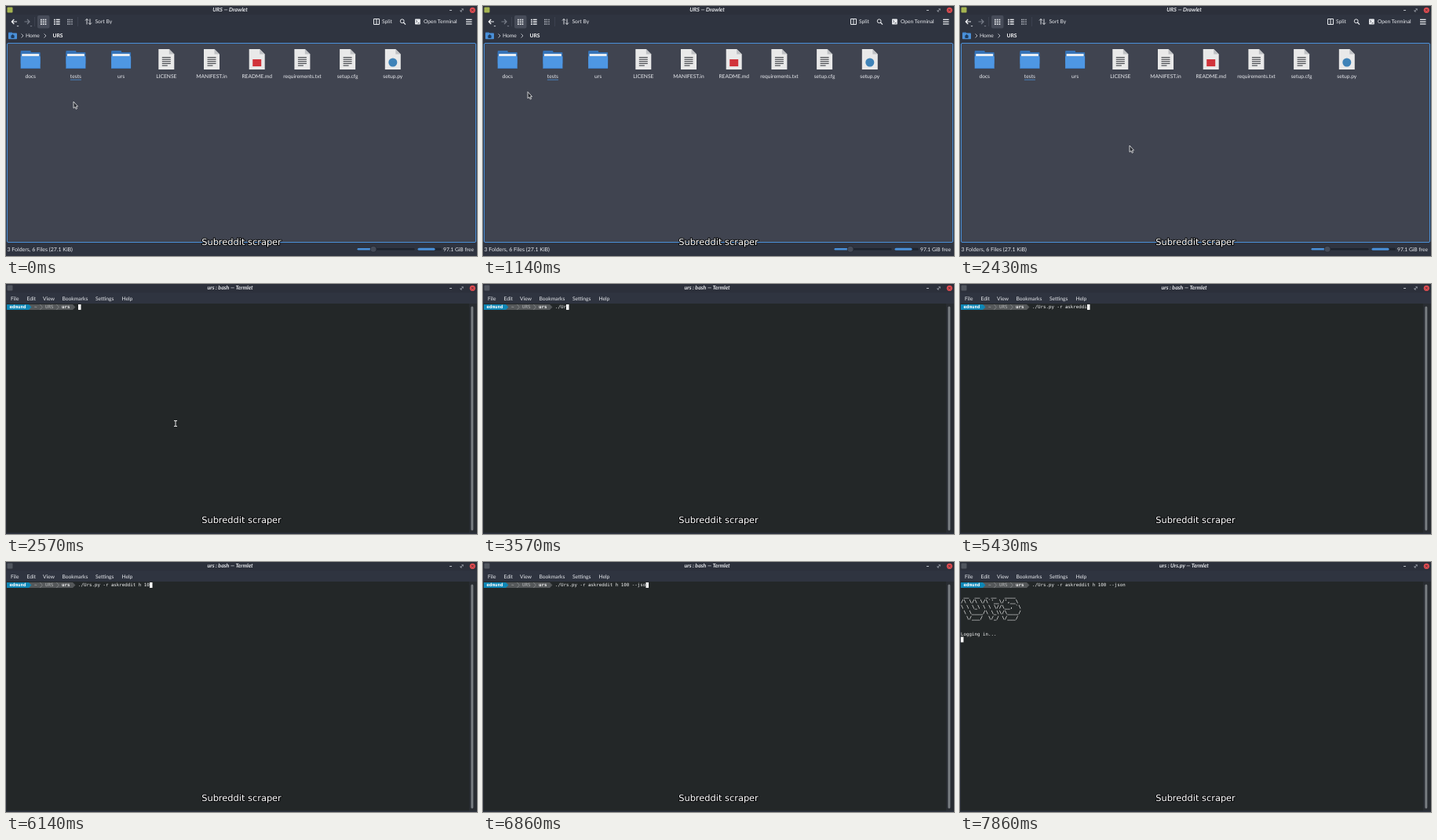
Animation of 600x319 px, one loop 8000 ms. Source, as an HTML page with a canvas:

```html
<!DOCTYPE html>
<html lang="en">
<head>
<meta charset="utf-8">
<title>Subreddit scraper</title>
<style>
html, body { margin: 0; width: 100%; height: 100%; overflow: hidden; background: #2c303b; }
canvas { display: block; }
</style>
</head>
<body>
<canvas id="stage" width="600" height="319"></canvas>
<script>
const ctx = document.getElementById("stage").getContext("2d");
ctx.textRendering = "geometricPrecision";

const LOOP = 8000, STEP = 1000 / 7;
const UI = "Lato, 'Open Sans', sans-serif";
const MONO = "'DejaVu Sans Mono', monospace";
const CELL = 3.5, ROW = 6.95;
const BLUE = "#4a90d9", PALE = "#e9ebef";

const COMMAND = "./Urs.py -r askreddit h 100 --json";
const BANNER = [
  " __  __  _ __   ____",
  "/\\ \\/\\ \\/\\`'__\\/',__\\",
  "\\ \\ \\_\\ \\ \\ \\//\\__, `\\",
  " \\ \\____/\\ \\_\\\\/\\____/",
  "  \\/___/  \\/_/ \\/___/"
];
const ITEMS = ["docs", "tests", "urs", "LICENSE", "MANIFEST.in", "README.md",
  "requirements.txt", "setup.cfg", "setup.py"];

// Keys are [step, value, ...].
const POINTER = [[0, 86, 122], [6, 29, 115], [7, 29, 115], [9, 85, 104], [11, 85, 104], [14, 216, 178]];
const TYPING = [[22, 0], [30, 11], [31, 12], [38, 20], [46, 30], [48, 33], [49, 34]];

function at(keys, s) {
  const i = keys.findIndex(k => k[0] > s);
  if (i < 0) return keys[keys.length - 1].slice(1);
  if (i === 0) return keys[0].slice(1);
  const a = keys[i - 1], b = keys[i], f = (s - a[0]) / (b[0] - a[0]);
  return a.slice(1).map((v, j) => v + (b[j + 1] - v) * f);
}

function rect(x, y, w, h, color, r = 0) {
  ctx.fillStyle = color;
  ctx.beginPath();
  ctx.roundRect(x, y, w, h, r);
  ctx.fill();
}

function disc(x, y, r, color) {
  ctx.fillStyle = color;
  ctx.beginPath();
  ctx.arc(x, y, r, 0, 7);
  ctx.fill();
}

function poly(points, color) {
  ctx.fillStyle = color;
  ctx.beginPath();
  points.forEach(p => ctx.lineTo(...p));
  ctx.closePath();
  ctx.fill();
}

function stroke(path, color, width = 1) {
  ctx.strokeStyle = color;
  ctx.lineWidth = width;
  ctx.stroke(new Path2D(path));
}

function text(str, x, y, { size = 6.7, weight = "", font = UI, color = PALE, align = "left" } = {}) {
  ctx.font = `${weight} ${size}px ${font}`;
  ctx.fillStyle = color;
  ctx.textAlign = align;
  ctx.fillText(str, x, y);
}

function mono(str, col, row, color = "#f4f5f5", weight = "") {
  text(str, 1 + col * CELL, 31.4 + row * ROW, { size: 5.81, font: MONO, color, weight });
}

function block(col, row) {
  rect(1 + col * CELL, 26 + row * ROW, CELL, ROW, "#fff");
}

function titleBar(title, icon) {
  rect(0, 0, 600, 11, "#2c303b");
  rect(1.5, 1.5, 7, 7, icon, 1);
  text(title, 285.5, 7.2, { size: 7, weight: "italic bold", align: "center" });
  stroke("M565 5.5h3", "#c5c8ce", 0.9);
  stroke("M579.2 6.8l3-3M580.3 3.7h2v2M579 5v2h2", "#aeb2ba", 0.7);
  disc(594.3, 5.3, 3.6, "#dc4b50");
  stroke("M593 4l2.6 2.6M595.6 4L593 6.6", "#4a2830", 0.8);
}

function toolbar() {
  stroke("M14 20H7.5M10.3 17L7.3 20l3 3", "#f4f5f7", 1.2);
  stroke("M23.500 20h6M27 17l3 3-3 3", "#777c88", 1.2);
  poly([[13.500, 25], [16.500, 25], [15, 26.600]], "#c8cbd1");
  poly([[30.500, 25], [33.500, 25], [32, 26.600]], "#777c88");
  rect(40, 12, 15.5, 16.500, "#474c59", 2);
  for (let i = 0; i < 3; i++) {
    const y = 16.7 + i * 2.8;
    for (let j = 0; j < 3; j++) {
      rect(44 + j * 2.8, y, 1.7, 1.7, "#eceef1");
      rect(78 + j * 2.6, y, j ? 1.5 : 1.8, 1.5, "#aeb2bb");
    }
    rect(61, y, 1.7, 1.7, PALE);
    rect(63.7, y, 5, 1.5, PALE);
    rect(586, y, 7.5, 1.3, PALE);
  }
  stroke("M36.5 14v12M91.5 14v12", "#414653", 0.8);
  stroke("M103 23.500v-7M101 18.500l2-2 2 2M107 16.500v7M105 21.500l2 2 2-2", PALE, 0.9);
  text("Sort By", 113.5, 22.4);
  stroke("M468.500 16.500h7v7h-7zM472 16.500v7", PALE, 1);
  text("Split", 479, 22.4);
  ctx.beginPath();
  ctx.arc(504.7, 19.3, 2.4, 0, 7);
  ctx.strokeStyle = PALE;
  ctx.stroke();
  stroke("M506.400 21l2.600 2.600", PALE, 1.3);
  rect(521, 16.5, 6.8, 7, PALE, 0.7);
  stroke("M522.300 18.300l1.500 1.300-1.500 1.300M524.500 21.800h2", "#2f3440", 0.8);
  text("Open Terminal", 532, 22.4);
}

function breadcrumbs() {
  rect(3, 33.5, 5, 3, "#3a78bd", 0.7);
  rect(3, 34.5, 11, 7.8, BLUE, 0.8);
  poly([[8.5, 36], [11.3, 38.5], [10.500, 38.5], [10.500, 41], [6.5, 41], [6.500, 38.500], [5.7, 38.500]], "#1d3b5e");
  stroke("M19.500 35.500l2.500 2.500-2.500 2.500M48.500 35.500l2.500 2.500-2.500 2.500", "#d5d8de", 0.8);
  text("Home", 25, 40.4);
  text("URS", 59.5, 40.4, { weight: "bold", color: "#fff" });
}

function folder(x) {
  rect(x - 12.5, 57, 13, 8, "#3674b8", 1);
  rect(x - 12.5, 59, 25, 15, "#3674b8", 1);
  rect(x - 11, 61, 22, 7, "#e8edf2", 0.6);
  rect(x - 12.5, 64, 25, 16, "#4e97e3", 1);
  rect(x - 12.5, 79, 25, 1, "#3b7cc4", 0.5);
}

function page(x) {
  poly([[x - 10, 55], [x + 3.5, 55], [x + 10, 61.5], [x + 10, 81], [x - 10, 81]], "#e9e9e9");
  poly([[x + 3.5, 55], [x + 10, 61.5], [x + 3.5, 61.5]], "#bfc1c4");
}

function item(name, i) {
  const x = 31.2 + i * 57.7;
  if (i < 3) folder(x);
  else {
    page(x);
    if (name === "README.md") rect(x - 5.5, 68, 11, 9, "#d1343b");
    else if (name === "setup.py") disc(x, 72, 5.5, "#3f83b8");
    else for (let k = 0; k < 5; k++) rect(x - 5.5, 65 + k * 2.6, k === 4 ? 7 : 11, 1.2, "#4b4d52");
  }
  text(name, x, 91.6, { align: "center" });
  if (name === "tests") rect(x - 7, 93.7, 14, 0.8, BLUE);
}

function statusBar() {
  text("3 Folders, 6 Files (27.1 KiB)", 1.5, 312.6, { size: 7 });
  rect(447.5, 309, 73, 2.4, "#1f242e", 1.2);
  rect(447.5, 309, 20, 2.4, BLUE, 1.2);
  disc(468, 310.2, 4.2, "#252a34");
  disc(468, 310.2, 3.5, "#454b58");
  rect(524.5, 308.7, 30.5, 3, "#1f242e", 1.5);
  rect(524.5, 308.7, 22, 3, BLUE, 1.5);
  text("97.1 GiB free", 557, 312.6);
}

function arrow(x, y) {
  const path = `M${x} ${y}v8.300l1.900-1.500 1.300 2.700 1.300-.600-1.200-2.600 2.200-.200z`;
  ctx.fillStyle = "#272a31";
  ctx.fill(new Path2D(path));
  stroke(path, "#f1f1f1", 0.8);
}

function fileManager(s) {
  rect(0, 0, 600, 319, "#2f3440");
  titleBar("URS — Drawlet", "#a5b450");
  toolbar();
  breadcrumbs();
  rect(1, 47, 598, 255, "#404450", 1.5);
  ctx.strokeStyle = BLUE;
  ctx.lineWidth = 1;
  ctx.beginPath();
  ctx.roundRect(1.5, 47.5, 597, 254, 1.5);
  ctx.stroke();
  ITEMS.forEach(item);
  statusBar();
  arrow(...at(POINTER, s));
}

function prompt() {
  const grey = "#55585a", teal = "#0e86b5", top = 26, mid = 29.5, end = 33;
  rect(32, top, 53, 7, grey);
  poly([[85, top], [88.5, mid], [85, end]], grey);
  rect(29, top, 3.5, 7, grey);
  rect(1, top, 28, 7, teal);
  poly([[29, top], [32.5, mid], [29, end]], teal);
  stroke("M43.300 26l3 3.500-3 3.500M64.300 26l3 3.500-3 3.500", "#999c9e", 0.6);
  mono("edmund", 1, 0, "#fff", "bold");
  mono("~", 10, 0, "#c4c6c7");
  mono("URS", 14, 0, "#b4b6b7");
  mono("urs", 20, 0, "#f0f0f0", "bold");
}

function terminal(s) {
  const running = s >= 53;
  rect(0, 0, 600, 319, "#232728");
  titleBar(`urs : ${running ? "Urs.py" : "bash"} — Termlet`, "#50555e");
  rect(0, 11, 600, 14, "#2f3440");
  [["File", 6], ["Edit", 26.5], ["View", 47], ["Bookmarks", 71.5], ["Settings", 114], ["Help", 147.5]]
    .forEach(([label, x]) => text(label, x, 20.6));
  rect(0, 25, 0.7, 292, "#30343f");
  rect(590, 25, 10, 294, "#292d32");
  rect(592.3, 28.5, 3, 286, "#777c80", 1.5);
  rect(0, 317.5, 600, 1.5, "#2f3440");

  prompt();
  const count = Math.round(at(TYPING, s)[0]);
  mono(COMMAND.slice(0, count), 26, 0);
  if (running) BANNER.forEach((line, i) => mono(line, 0, i + 2, "#fff", "bold"));
  if (s >= 54) mono("Logging in...", 0, 9);
  if (s < 50) block(26 + count, 0);
  else block(0, s >= 54 ? 10 : running ? 8 : 1);
  if (s < 23) stroke("M214 174.500h4M214 181.500h4M216 174.500v7", "#e6e6e6", 1);
}

function caption() {
  ctx.font = "11.4px 'DejaVu Sans', sans-serif";
  ctx.textAlign = "center";
  ctx.lineJoin = "round";
  ctx.lineWidth = 2;
  ctx.strokeStyle = "#0b0c0e";
  ctx.strokeText("Subreddit scraper", 300, 304.8);
  ctx.fillStyle = "#fff";
  ctx.fillText("Subreddit scraper", 300, 304.8);
}

function draw() {
  // Small bias keeps rounded clock times on the right side of a step.
  const s = Math.floor((performance.now() % LOOP + 5) / STEP) % 56;
  (s < 18 ? fileManager : terminal)(s);
  caption();
  requestAnimationFrame(draw);
}
draw();
</script>
</body>
</html>
```
